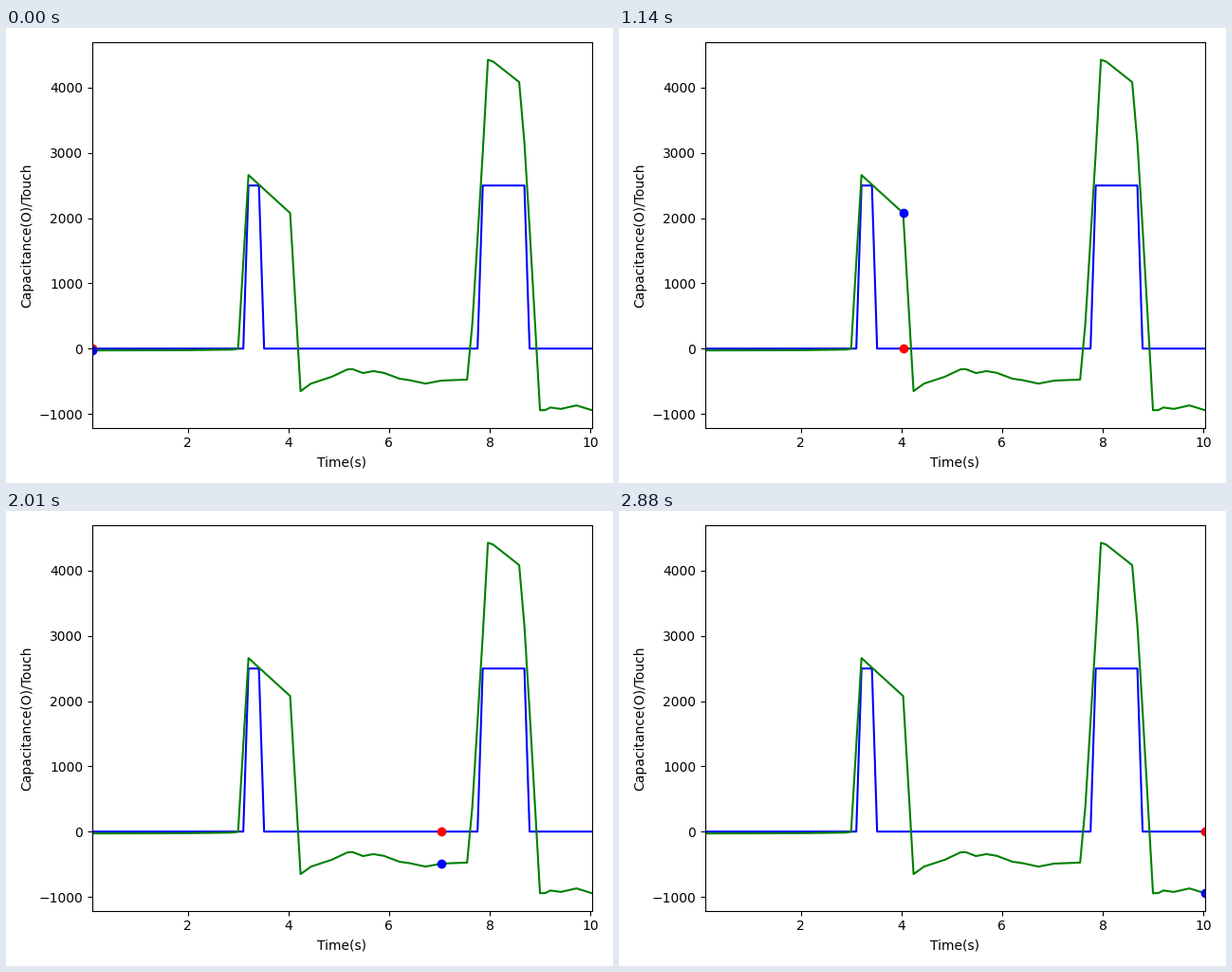
A matplotlib script for the animation above (2910 ms loop, 640x480 px).

```python
import numpy as np
import matplotlib.pyplot as plt
from matplotlib.animation import FuncAnimation

plt.rcParams["font.family"] = "DejaVu Sans"

N = 97
STEP_MS = 30
k = np.arange(N)
t = 0.10345 * (k + 1)

# Touch signal: two rectangular pulses
pressed = ((k >= 30) & (k < 33)) | ((k >= 75) & (k < 84))
touch = np.where(pressed, 2500, 0)

# Capacitance: straight runs between (sample, value) turning points
idle = [(0, -28), (18, -25), (27, -15), (28, -2)]
first_press = [(30, 2660), (38, 2078), (40, -652)]
drift = [(42, -537), (46, -432), (49, -319), (50, -315), (52, -375),
         (54, -345), (56, -372), (59, -462), (61, -485), (64, -537),
         (67, -491), (72, -475)]
second_press = [(73, 380), (75, 3000), (76, 4428), (77, 4400),
                (82, 4085), (83, 3160), (84, 1850)]
tail = [(86, -945), (87, -943), (88, -903), (90, -925), (93, -871), (96, -945)]
cap = np.interp(k, *zip(*idle, *first_press, *drift, *second_press, *tail))

fig, ax = plt.subplots(figsize=(6.4, 4.8), dpi=100)
ax.plot(t, touch, "b")
ax.plot(t, cap, "g")
touch_dot, = ax.plot([], [], "ro")
cap_dot, = ax.plot([], [], "bo")
ax.set_xlim(t[0], t[-1])
ax.set_xlabel("Time(s)")
ax.set_ylabel("Capacitance(O)/Touch")
fig.tight_layout()


def update(i):
    touch_dot.set_data([t[i]], [touch[i]])
    cap_dot.set_data([t[i]], [cap[i]])
    return touch_dot, cap_dot


anim = FuncAnimation(fig, update, frames=N, interval=STEP_MS, repeat=True,
                     repeat_delay=0)
plt.show()
```
